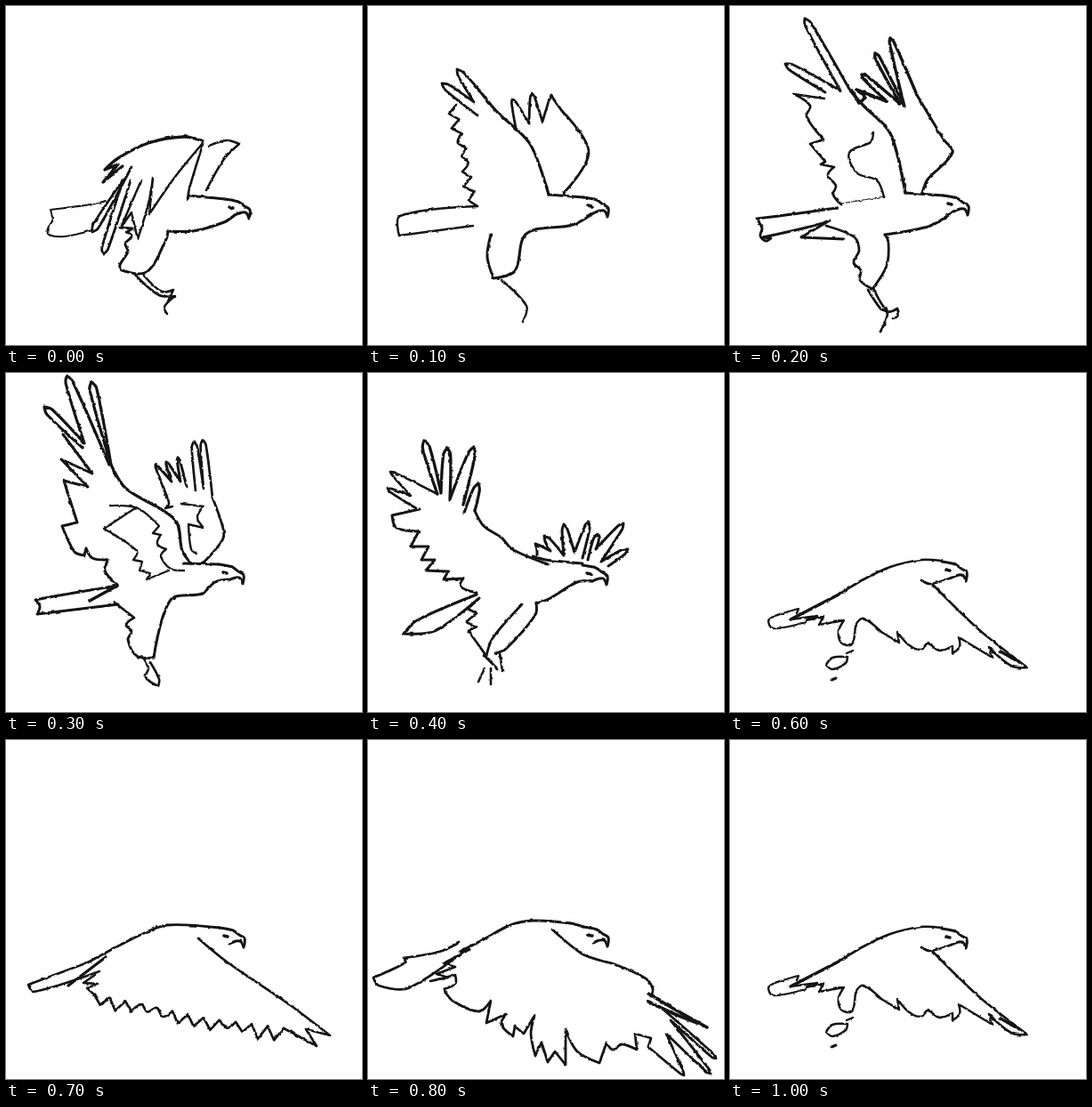
These frames come from a looping animation (400x381 px, 1100 ms). An HTML page:

```html
<!DOCTYPE html>
<html lang="en">
<head>
<meta charset="utf-8">
<title>Flying eagle</title>
<style>
  html, body { margin: 0; width: 100%; height: 100%; overflow: hidden; background: #fefefe; }
  svg { display: block; width: 100vw; height: 100vh; }
  path { fill: none; stroke: #141414; stroke-linecap: round; stroke-linejoin: round; }
</style>
</head>
<body>
<svg viewBox="0 0 400 381">
  <filter id="ink" filterUnits="userSpaceOnUse" x="0" y="0" width="400" height="381" color-interpolation-filters="sRGB">
    <feTurbulence type="fractalNoise" baseFrequency=".16" numOctaves="2" seed="4" result="grain"/>
    <feDisplacementMap in="SourceGraphic" in2="grain" scale="2.6" xChannelSelector="R" yChannelSelector="G"/>
  </filter>
  <g id="bird" filter="url(#ink)"></g>
</svg>
<script>
const STEP = 100;

const parse = text => text.split(" ").map(pair => pair.split(",").map(Number));

// Rounds gentle bends while keeping feather tips sharp.
function smooth(points) {
  const tangents = points.map((p, i) => {
    const a = points[i - 1], b = points[i + 1];
    if (!a || !b) return [0, 0];
    const turn = (p[0] - a[0]) * (b[0] - p[0]) + (p[1] - a[1]) * (b[1] - p[1]);
    const length = Math.hypot(b[0] - a[0], b[1] - a[1]);
    return turn <= 0 ? [0, 0] : [(b[0] - a[0]) / length, (b[1] - a[1]) / length];
  });
  return points.reduce((d, p, i) => {
    if (!i) return "M" + p;
    const q = points[i - 1], s = tangents[i - 1], e = tangents[i];
    const pull = Math.hypot(p[0] - q[0], p[1] - q[1]) * .3;
    return d + "C" + [
      q[0] + s[0] * pull, q[1] + s[1] * pull,
      p[0] - e[0] * pull, p[1] - e[1] * pull, ...p
    ].map(n => n.toFixed(1));
  }, "");
}

const stroke = (width, points) => `<path stroke-width="${width}" d="${smooth(points)}"/>`;
const ink = (width, text) => stroke(width, parse(text));

// Alternating valleys and tips; every tip becomes a rounded feather end.
function fan(width, size, text) {
  const points = parse(text);
  return stroke(width, points.flatMap((tip, i) => {
    if (i % 2 === 0) return [tip];
    const a = points[i - 1], b = points[i + 1];
    const dx = tip[0] - (a[0] + b[0]) / 2, dy = tip[1] - (a[1] + b[1]) / 2;
    const length = Math.hypot(dx, dy), ux = dx / length, uy = dy / length;
    const side = (a[1] - b[1]) * ux - (a[0] - b[0]) * uy < 0 ? -1 : 1;
    const shoulder = s => [tip[0] - ux * size - uy * s * size / 2, tip[1] - uy * size + ux * s * size / 2];
    return [shoulder(side), tip, shoulder(-side)];
  }));
}

// Ragged feather edge between two points.
function rag(width, text, teeth, depth) {
  const [[x1, y1], [x2, y2]] = parse(text);
  const dx = x2 - x1, dy = y2 - y1, length = Math.hypot(dx, dy);
  return stroke(width, Array.from({ length: teeth * 2 + 1 }, (_, i) => {
    const t = i / teeth / 2, out = i % 2 * depth * (.75 + .25 * Math.sin(i * 7));
    return [x1 + dx * t - dy / length * out, y1 + dy * t + dx / length * out];
  }));
}

// Crown, hooked beak and eye, placed by the tip of the beak.
function head(x, y) {
  const at = text => parse(text).map(p => [x + p[0], y + p[1]]);
  return stroke(3, at("-27,-22 -12,-19 -5,-14 1,-10 0,0 -4,-7 -16,-4")) + stroke(3.5, at("-22,-13 -18,-12"));
}

const lift = () => head(273, 239)
  + ink(3, "206,213 225,215 246,217")
  + ink(3.2, "257,235 245,243 210,253 182,253")
  + ink(3, "182,253 180,262 158,299 130,297 128,291 137,276 134,267 141,259 136,254 142,250 128,249")
  + ink(3.3, "222,152 200,147 160,154 126,171 111,184 126,178 109,198 131,180")
  + fan(2.8, 7, "141,181 97,254 132,195 109,279 140,196")
  + ink(2.5, "152,196 129,249 141,232 148,262 160,222 165,194 161,234 190,192 222,153 206,205 204,217")
  + ink(2.6, "228,157 248,151 262,155 245,172 225,207")
  + ink(2, "112,219 95,223 50,229 52,241 47,250 48,257 66,259 97,252")
  + ink(2.6, "146,303 172,325 190,326 178,338 181,346")
  + ink(2.6, "155,303 175,321 188,319 182,332");

const raise = () => head(269, 237)
  + ink(3.2, "203,212 182,155 145,119 126,96")
  + fan(2.8, 7, "126,96 100,71 119,108 83,87 123,123")
  + rag(2.6, "99,111 123,225", 7, 11)
  + fan(2.8, 5, "166,137 162,104 181,132 184,98 196,130 206,100 218,118")
  + ink(2.8, "218,118 248,164 220,210")
  + ink(3, "203,212 242,215")
  + ink(3, "253,233 230,246 178,256 165,298 141,306 134,282 138,257")
  + ink(2.5, "123,225 36,236 35,258 118,247")
  + ink(2.6, "150,308 178,337 174,355");

const high = () => head(267, 235)
  + fan(2.9, 7, "107,97 62,65 124,95 84,14 135,95")
  + ink(3.4, "135,95 150,112 180,143 197,210")
  + ink(3.6, "137,95 145,109 151,102 142,94 176,107")
  + fan(3.4, 5, "176,107 148,77 191,110 163,53 196,113 180,36 210,100")
  + ink(3, "210,100 240,150 250,165 222,195 216,210")
  + ink(2.7, "106,104 72,99 90,112 86,124 105,150 90,155 107,175 102,178 117,181 110,190 119,202 116,212 125,223")
  + ink(2.4, "161,142 158,153 134,165 143,188 165,196 173,215")
  + ink(1.2, "125,222 174,214")
  + ink(3, "197,210 240,213")
  + ink(3.1, "251,231 225,247 174,257")
  + ink(2.8, "174,257 178,265 176,292 160,318 146,308 147,297 139,288 145,275 140,260 108,247")
  + ink(2.9, "120,227 70,234 30,239 36,250 34,258 40,264 46,261 37,260 90,248 112,241 80,260 128,262")
  + ink(2.8, "155,319 169,340 177,345 169,366")
  + ink(2.8, "161,317 177,343 188,340 189,348 183,351");

const spread = () => head(266, 237)
  + fan(3.2, 8, "116,103 68,3 88,79 43,38 86,84")
  + fan(3.2, 8, "118,103 96,10 118,103")
  + ink(3.2, "118,103 135,130 190,165 198,200 208,214")
  + ink(3, "64,69 97,113 62,97 92,128 65,121 80,168 63,172 77,201 88,205 90,197 97,208 115,210 111,222 125,238")
  + ink(2.4, "117,149 148,152 172,172 165,180 174,182 170,192 180,198 174,206 185,220 200,222")
  + ink(2.3, "145,152 110,175 147,200 143,210 153,212 150,222 162,225 158,232 183,222")
  + ink(2.6, "187,150 179,152 183,147 180,137")
  + fan(3, 3, "180,137 168,103 186,122 180,100 196,122 193,95 203,128")
  + fan(2.7, 6, "213,132 211,77 222,130 221,75 232,140")
  + ink(2.8, "232,140 244,175 243,188 222,213")
  + ink(2.4, "197,147 222,150 215,162 222,174 205,170 208,198 214,203")
  + ink(3, "200,214 239,215")
  + ink(3, "250,232 235,235 220,248 185,255 166,320")
  + ink(2.8, "166,320 147,318 137,300 141,290 135,283 144,275 122,258")
  + ink(3, "125,239 48,252 33,255 38,262 35,271 126,260")
  + ink(3.6, "94,256 125,239")
  + ink(2.6, "155,321 160,332 157,342 171,352 172,344 162,325");

const beat = () => head(268, 238)
  + fan(2.7, 4, "54,152 22,130 48,138 25,111 78,136")
  + fan(3.3, 8, "78,136 63,76 82,135 89,84 92,142 119,83 107,148")
  + fan(3.2, 7, "108,157 124,124 120,155")
  + ink(3, "120,155 130,172 150,185 162,198 202,215")
  + ink(2.9, "58,153 27,160 32,174 57,178 48,195 68,195 60,210 75,210 65,222 90,223 85,232 107,231 104,240 123,247")
  + ink(3, "122,249 55,278 40,293 75,290 125,253")
  + ink(2.8, "123,255 112,265 122,270 110,280 122,285 113,290 133,318 140,298 173,260")
  + ink(3, "189,258 188,272 155,310 143,315")
  + ink(2.6, "131,332 124,347") + ink(2.6, "138,332 138,350")
  + ink(2.6, "148,315 151,335") + ink(2.8, "130,317 145,332")
  + fan(3, 6, "190,205 188,192 205,200 198,183 220,205 220,170 232,202 248,168 241,208")
  + fan(3, 6, "247,210 258,181 256,198 287,169 262,212 292,198 270,217")
  + ink(3, "185,206 200,210 241,214")
  + ink(3, "252,234 235,235 205,253 189,259");

const level = () => head(267, 236)
  + ink(3, "205,211 148,207 58,195")
  + fan(2.9, 7, "58,195 5,202 49,211 6,224 54,220 29,238 67,229")
  + rag(2.8, "67,229 130,252", 5, 10)
  + ink(2.6, "110,253 43,283 48,291 124,260")
  + ink(2.8, "130,257 123,270 134,278 126,289 144,309 181,258")
  + ink(2.6, "139,307 127,328") + ink(2.6, "145,307 140,333")
  + ink(3, "205,211 240,213")
  + ink(3, "251,232 215,246 181,258")
  + ink(2.8, "229,238 270,250 302,261")
  + rag(2.6, "302,261 213,249", 6, -9);

const glide = () => head(265, 234)
  + ink(2.7, "70,276 120,250 150,232 180,218 215,210 238,211")
  + ink(2.7, "249,230 225,237 215,233")
  + ink(3.3, "68,277 122,249")
  + ink(2.6, "227,237 260,270 285,293 334,331 318,330 300,317")
  + ink(3.5, "304,313 325,325")
  + ink(2.5, "300,317 291,308 295,320 257,297 258,308 250,315 250,307 235,312 222,304 215,311 200,305 188,291 190,303 170,291")
  + ink(2.5, "170,291 150,276 142,282 137,305 125,303 122,290 128,278 100,283 105,274 85,278 98,273 68,277")
  + ink(2.3, "75,270 77,265 66,268 44,277 48,287 85,280")
  + ink(2.6, "108,328 115,320 132,319 130,326 115,333 108,328")
  + ink(2.4, "138,312 131,315") + ink(3, "114,345 119,343");

const reach = () => head(267, 233)
  + ink(2.8, "92,250 151,219 181,208 240,211")
  + ink(2.7, "216,223 249,250 318,297 364,332 337,325 349,344 312,324")
  + rag(2.7, "312,324 222,312", 5, -16)
  + rag(2.7, "222,312 99,286", 7, -13)
  + ink(2.6, "92,250 25,275 31,283 105,260")
  + ink(3.2, "70,276 112,244")
  + ink(2.5, "99,286 91,279 103,274 87,273 100,264");

const sweep = () => head(269, 232)
  + ink(3, "103,238 130,224 160,208 185,203 228,206 242,210")
  + ink(2.8, "207,213 240,240 262,248 277,252 312,268 320,280 318,288")
  + ink(3.6, "315,285 340,300 381,323") + ink(3.8, "315,294 340,306 370,318")
  + fan(2.8, 4, "333,304 391,358 340,315 385,375 335,330 355,377 315,345")
  + ink(2.8, "315,345 318,335 300,330 302,348 285,342 275,348 268,340 260,363 235,350 222,325 222,365 210,350 202,362 195,340")
  + ink(2.8, "195,340 188,355 183,330 187,310 175,330 165,322 163,333 150,320 155,308 133,318 138,293 125,305 95,293 85,280")
  + ink(2.8, "102,228 80,238 40,245 42,250 6,267 12,276 45,279 110,236")
  + ink(5, "108,236 113,235")
  + ink(2.7, "85,280 98,274 98,264 70,271 90,267 77,263 98,255 85,251 104,241");

const drawings = [lift, raise, high, spread, beat, level, glide, reach, sweep, reach, glide].map(pose => pose());
const bird = document.getElementById("bird");
const start = performance.now();
let shown = -1;

function render(now) {
  const index = Math.floor(Math.max(0, now - start) / STEP) % drawings.length;
  if (index !== shown) bird.innerHTML = drawings[shown = index];
  requestAnimationFrame(render);
}
render(start);
</script>
</body>
</html>
```
